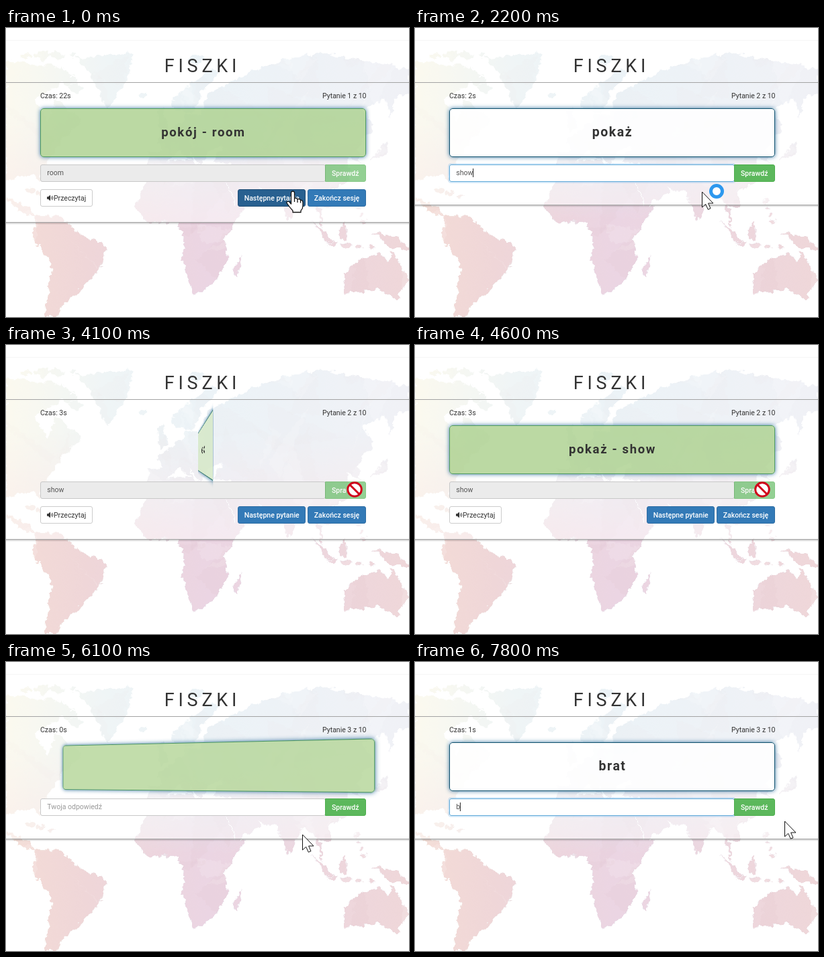
These frames come from a looping animation (600 by 432 pixels, 8 s). An HTML page:

```html
<!DOCTYPE html>
<html lang="pl">
<head>
<meta charset="utf-8">
<title>Fiszki</title>
<style>
  html, body { margin: 0; width: 100%; height: 100%; overflow: hidden; background: #fff; }
  svg, .space { position: absolute; left: 0; top: 0; width: 600px; height: 432px; overflow: hidden; }
  text, .face { font-family: Roboto, Arial, sans-serif; }
  text { font-size: 10.5px; fill: #333; }
  .white { fill: #fff; font-weight: 500; }
  .space { perspective: 760px; perspective-origin: 293.5px 171px; }
  #card { position: absolute; left: 51px; top: 120px; width: 485px; height: 73px; transform-style: preserve-3d; }
  .face {
    position: absolute; inset: 0; box-sizing: border-box; border: 1px solid; border-radius: 5px;
    box-shadow: 0 0 6px rgba(22, 95, 145, .85); backface-visibility: hidden;
    font-weight: 700; color: #333; text-align: center; text-indent: 1px; line-height: 70px; white-space: pre;
  }
  #front { font-size: 19.5px; letter-spacing: 1.5px; }
  #back { font-size: 18.5px; letter-spacing: 1.65px; transform: rotateY(180deg); }
</style>
</head>
<body>
<svg viewBox="0 0 600 432">
  <defs>
    <linearGradient id="north" gradientUnits="userSpaceOnUse" x1="0" x2="600">
      <stop offset="0" stop-color="#f8f4df"/>
      <stop offset=".25" stop-color="#e0ebee"/>
      <stop offset=".5" stop-color="#d9e7ef"/>
      <stop offset="1" stop-color="#e2e4ee"/>
    </linearGradient>
    <linearGradient id="south" gradientUnits="userSpaceOnUse" x1="0" x2="600">
      <stop offset="0" stop-color="#f4dcd6"/>
      <stop offset=".2" stop-color="#efd6d8"/>
      <stop offset=".5" stop-color="#ebd5e3"/>
      <stop offset="1" stop-color="#efd7d9"/>
    </linearGradient>
    <linearGradient id="fade" x2="0" y2="1">
      <stop offset=".3" stop-color="#000"/>
      <stop offset=".66" stop-color="#fff"/>
    </linearGradient>
    <linearGradient id="drop" x2="0" y2="1">
      <stop offset="0" stop-color="#000" stop-opacity=".22"/>
      <stop offset="1" stop-color="#000" stop-opacity="0"/>
    </linearGradient>
    <mask id="low"><rect width="600" height="432" fill="url(#fade)"/></mask>
    <clipPath id="land"><path id="coast"/></clipPath>
    <filter id="rough" filterUnits="userSpaceOnUse" x="0" y="0" width="600" height="432" color-interpolation-filters="sRGB">
      <feTurbulence type="fractalNoise" baseFrequency=".1" numOctaves="3" seed="4"/>
      <feDisplacementMap in="SourceGraphic" scale="12" xChannelSelector="R" yChannelSelector="G"/>
    </filter>
  </defs>

  <rect width="600" height="432" fill="#fff"/>
  <g filter="url(#rough)">
    <g clip-path="url(#land)">
      <rect width="600" height="432" fill="url(#north)"/>
      <rect width="600" height="432" fill="url(#south)" mask="url(#low)"/>
      <g id="facets"></g>
    </g>
  </g>

  <rect id="veil" width="600" fill="#fff" opacity=".5"/>
  <g id="edge">
    <rect width="600" height="1" fill="#a8a8a8"/>
    <rect y="1" width="600" height="3" fill="url(#drop)"/>
  </g>
  <rect y="18" width="600" height="1" fill="#f6f6f6"/>
  <rect y="81" width="600" height="1" fill="#a3a3a3"/>

  <text x="235.7" y="65.5" style="font-size:27px;letter-spacing:5.8px">FISZKI</text>
  <text id="timer" x="51" y="105"></text>
  <text id="count" x="536.5" y="105" text-anchor="end"></text>

  <rect id="glow" x="50" y="203" width="427" height="28" rx="3.5" fill="none" stroke="#66afe9" stroke-width="2" opacity=".25"/>
  <rect id="field" x="51.5" y="204.5" width="424" height="25" rx="2.5"/>
  <text id="answer" x="61.3" y="220"></text>
  <rect id="caret" y="210" width="1" height="13" fill="#222"/>

  <g id="check">
    <path id="checkBox" d="M475.5 204.5H533a2.5 2.5 0 0 1 2.5 2.5V227a2.5 2.5 0 0 1 -2.5 2.5H475.5Z"/>
    <text class="white" x="485" y="220.5">Sprawdź</text>
  </g>

  <g id="tools">
    <rect x="51.5" y="241.5" width="77" height="25" rx="2.5" fill="#fff" stroke="#ccc"/>
    <path d="M61 252.3h2l3-2.8v9l-3-2.8h-2Z" fill="#333"/>
    <path d="M67.3 252.2q1.4 1.8 0 3.6M68.7 250.8q2.6 3.2 0 6.4" fill="none" stroke="#333" stroke-width=".9"/>
    <text x="71" y="258">Przeczytaj</text>
    <rect id="next" x="345.5" y="241.5" width="100" height="25" rx="2.5"/>
    <text class="white" x="354.7" y="258">Następne pytanie</text>
    <rect id="quit" x="449.5" y="241.5" width="86" height="25" rx="2.5"/>
    <text class="white" x="458.7" y="258">Zakończ sesję</text>
  </g>
</svg>

<div class="space">
  <div id="card"><div class="face" id="front"></div><div class="face" id="back"></div></div>
</div>

<svg viewBox="0 0 600 432">
  <g id="pointer">
    <path id="arrow" d="M.5 0V23L5.7 18.3 9.3 26.3 13 24.7 9.6 17H17Z" fill="#fff" stroke="#111"/>
    <circle id="ring" cx="22" cy="-1" r="8.5" fill="#fff" stroke="#2d98ee" stroke-width="5"/>
    <path id="hand" fill="#fff" stroke="#111" stroke-width="1.3" stroke-linejoin="round"
      d="M-2.5 2Q-2.5 -1 0 -1T2.5 2V10Q5 8 7 11 10 9.5 11.5 12.5 15 12 15 16V21Q15 25 12 28V30.5H0V28Q-4 24 -9 16.5 -9 13 -5.5 14.5L-2.5 18ZM2.5 10v5M7 11v5M11.5 12.5v4"/>
    <g id="ban" stroke="#d0021b" stroke-width="3">
      <circle r="10.3" fill="#fff"/>
      <path d="M-7 -7L7 7"/>
    </g>
  </g>
</svg>

<script>
const LOOP = 8000, STEP = 100;
const $ = id => document.getElementById(id);
const set = (id, attrs) => { for (const k in attrs) $(id).setAttribute(k, attrs[k]); };
const show = (id, on) => set(id, { display: on ? 'inline' : 'none' });
const mix = (a, b, p) => a + (b - a) * p;

let seed = 11;
const rnd = () => (seed = seed * 16807 % 2147483647) / 2147483647;

// Key points of each coast; the turbulence filter adds the detail
const coasts = {
  northAmerica: '-9 48 78 58 90 78 42 106 63 142 74 104 112 140 80 172 50 216 52 232 40 218 -9 230',
  centralAmerica: '-9 248 30 265 46 282 26 278',
  greenland: '106 44 190 38 178 84 152 121 128 76',
  southAmerica: '44 280 78 281 112 309 151 326 136 365 113 388 80 420 74 440 56 440 70 358 40 314',
  africa: '218 204 263 195 319 213 341 264 356 267 325 316 330 345 312 378 280 400 262 345 268 330 256 291 210 290 193 268',
  madagascar: '351 340 344 374 336 364',
  arabia: '322 216 350 212 379 243 344 268',
  eurasia: '213 206 211 186 234 184 225 168 262 142 268 128 292 130 300 98 340 78 395 52 470 36 609 64 609 95 578 104 ' +
    '573 134 565 104 532 120 547 146 523 180 528 202 507 190 512 226 480 246 486 270 468 264 472 300 458 256 ' +
    '440 248 421 288 404 246 362 234 340 206 308 200 322 178 300 184 292 206 270 182 280 202 258 184 230 207',
  scandinavia: '250 120 248 106 305 60 316 68 290 98 278 128',
  britain: '226 124 233 118 243 150 229 154',
  japan: '543 197 566 170 568 190',
  sumatra: '456 289 487 318 480 322',
  borneo: '492 302 507 291 508 316 495 314',
  newGuinea: '546 304 580 313 609 336 568 326',
  australia: '502 366 532 345 558 338 568 352 576 334 598 376 582 405 552 390 506 396'
};

// Small islands strewn along a line
function isles(n, x0, y0, x1, y1, size) {
  let d = '';
  for (let i = 0; i < n; i++) {
    const r = size * (.5 + rnd()), x = mix(x0, x1, i / (n - 1)), y = mix(y0, y1, i / (n - 1));
    d += `M${x - r} ${y}L${x} ${y - r * .7} ${x + r} ${y} ${x} ${y + r * .7}Z`;
  }
  return d;
}
set('coast', {
  d: Object.values(coasts).map(c => `M${c}Z`).join('') +
    isles(4, 30, 42, 100, 40, 14) + isles(3, 84, 70, 104, 90, 12) + isles(4, 488, 323, 545, 328, 7) +
    isles(4, 522, 258, 532, 290, 5) + isles(3, 36, 243, 68, 251, 7) + isles(2, 204, 100, 284, 46, 10)
});

// Faint low-poly shading over the land
let tris = '';
for (let i = 0; i < 70; i++) {
  const x = rnd() * 600, y = rnd() * 432;
  const corner = () => `${x + rnd() * 130 - 65} ${y + rnd() * 130 - 65} `;
  tris += `<path d="M${corner()}${corner()}${corner()}Z" fill="${i % 2 ? '#fff' : '#c89a9a'}" opacity="${i % 2 ? .14 : .05}"/>`;
}
$('facets').innerHTML = tris;

// CSS "ease" curve
function ease(x) {
  if (x <= 0) return 0;
  if (x >= 1) return 1;
  let lo = 0, hi = 1, s;
  for (let i = 0; i < 24; i++) {
    s = (lo + hi) / 2;
    if (.75 * s * (1 - s) + s ** 3 < x) lo = s; else hi = s;
  }
  return .3 * s * (1 - s) ** 2 + 3 * s * s * (1 - s) + s ** 3;
}

// Times: shown, turned to the front, focused, first key, checked
const cards = [
  { at: -22000, flip: -22000, focus: -22000, key: -9000, check: -5000, word: 'pokój', answer: 'room' },
  { at: 200, flip: 188, focus: 400, key: 1700, check: 3600, word: 'pokaż', answer: 'show' },
  { at: 5900, flip: 6058, focus: 6700, key: 7700, check: Infinity, word: 'brat', answer: 'b' }
];
const moves = [
  { at: 2700, time: 800, x: 519, y: 216 },
  { at: 4500, time: 100, x: 517, y: 216 },
  { at: 4800, time: 800, x: 441, y: 258 },
  { at: 7200, time: 500, x: 550, y: 238 }
];

function pointerAt(t) {
  let x = 427, y = 245;
  for (const m of moves) {
    const p = ease((t - m.at) / m.time);
    x = mix(x, m.x, p);
    y = mix(y, m.y, p);
  }
  return [x, y];
}

function drawCard(t, card, done) {
  const p = done ? ease((t - card.check - 290) / 700) : 1 - ease((t - card.flip) / 400);
  const rgb = (a, b) => a.map((v, i) => Math.round(mix(v, b[i], p))).join();
  $('card').style.transform = `rotateY(${180 * p}deg)`;
  for (const id of ['front', 'back']) {
    $(id).style.background = `rgba(${rgb([255, 255, 255], [172, 209, 143])},${mix(.86, .82, p)})`;
    $(id).style.borderColor = `rgb(${rgb([14, 80, 108], [80, 155, 98])})`;
  }
  $('front').textContent = card.word;
  $('back').textContent = done ? `${card.word} - ${card.answer}` : '';
}

function drawForm(t, card, done) {
  const [x, y] = pointerAt(t);
  const over = (l, r, top, bottom) => x >= l && x <= r && y >= top && y <= bottom;
  const onCheck = over(475, 536, 204, 230);
  const onNext = done && over(345, 446, 241, 267);
  const onQuit = done && over(449, 536, 241, 267);
  const focus = !done && t >= card.focus;
  const keys = Math.max(0, Math.floor((t - card.key) / 130) + 1);
  const value = card.answer.slice(0, keys);

  show('glow', focus);
  set('field', { fill: done ? '#ebebeb' : '#fff', stroke: focus ? '#5fa9d8' : '#c8c8c8' });
  $('answer').textContent = value || 'Twoja odpowiedź';
  $('answer').style.fill = value ? '#555' : '#999';
  show('caret', focus && (value || (t - card.focus) % 1000 < 500));
  set('caret', { x: 61 + (value ? $('answer').getComputedTextLength() : 0) });

  const paint = (id, on, base, hot) => {
    const [fill, stroke] = on ? hot : base;
    set(id, { fill, stroke });
  };
  const blue = ['#337ab7', '#2e6da4'], deep = ['#286090', '#204d74'];
  paint('checkBox', onCheck && !done, ['#5cb85c', '#4cae4c'], ['#449d44', '#398439']);
  paint('next', onNext, blue, deep);
  paint('quit', onQuit, blue, deep);
  set('check', { opacity: done ? .66 : 1 });
  show('tools', done);

  const ban = done && onCheck, hand = onNext || onQuit || (onCheck && !done);
  show('ban', ban);
  show('hand', hand);
  show('arrow', !ban && !hand);
  show('ring', t >= 300 && t < 2900);
  set('pointer', { transform: `translate(${x} ${y})` });
}

function draw(time) {
  const t = Math.floor(time % LOOP / STEP) * STEP;
  const index = cards.filter(c => c.at <= t).length - 1;
  const card = cards[index], done = t >= card.check;
  const bottom = done ? 290 : 264;
  // The first card keeps its final time of 22 s
  const stop = index ? Math.min(t, card.check) : 0;
  set('veil', { height: bottom });
  set('edge', { transform: `translate(0 ${bottom})` });
  $('timer').textContent = `Czas: ${Math.floor((stop - card.at) / 1000)}s`;
  $('count').textContent = `Pytanie ${index + 1} z 10`;
  drawCard(t, card, done);
  drawForm(t, card, done);
}

const start = performance.now();
let shown = -1;
function tick() {
  const time = performance.now() - start, step = Math.floor(time / STEP);
  if (step !== shown) draw(time);
  shown = step;
  requestAnimationFrame(tick);
}
tick();
</script>
</body>
</html>
```
